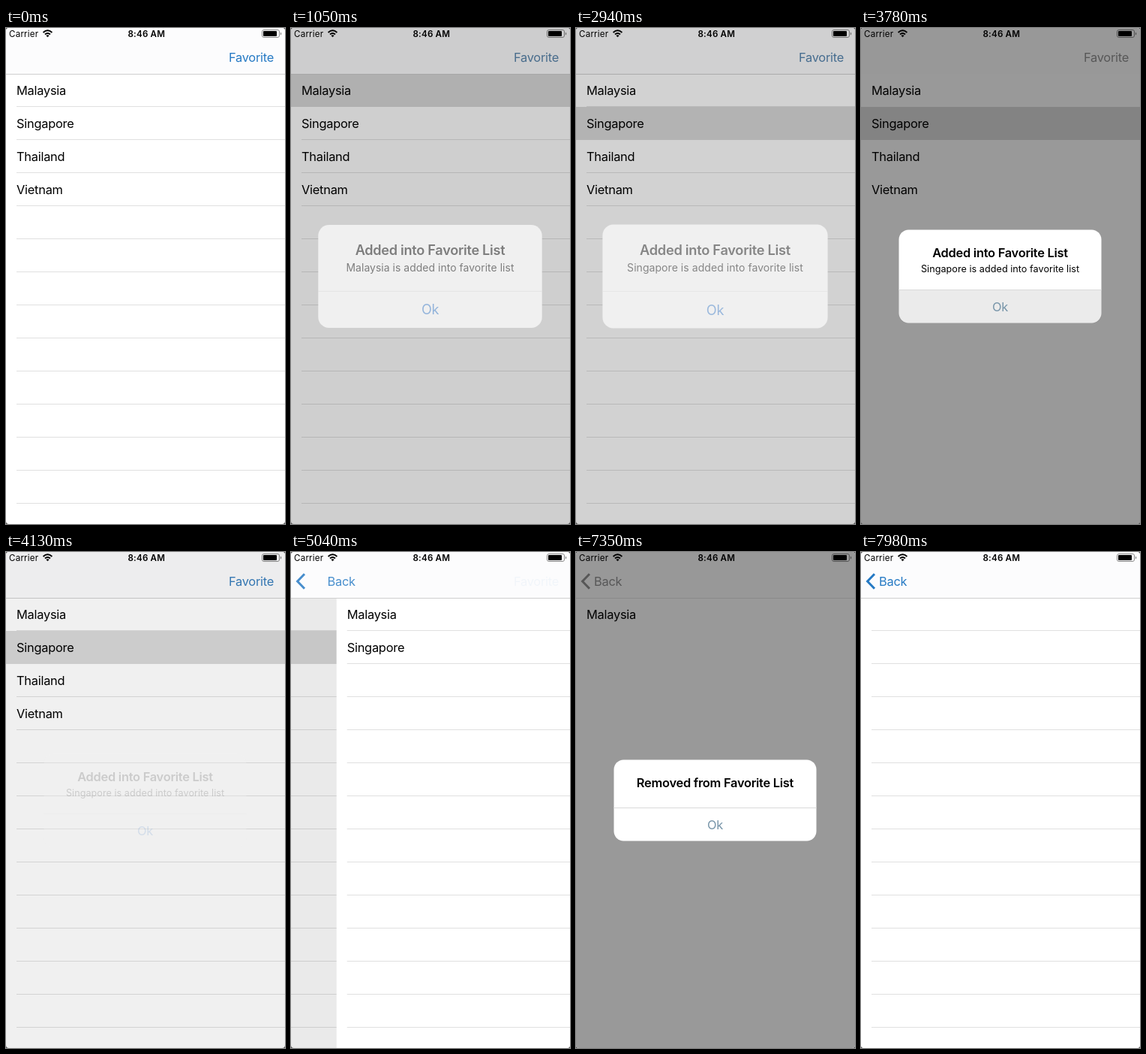
Animation, 372 px wide and 660 px high, one loop 8 s. Source, as an HTML page:

```html
<!DOCTYPE html>
<html lang="en">
<head>
<meta charset="utf-8">
<title>Favorite list</title>
<style>
  html, body { margin: 0; width: 100%; height: 100%; overflow: hidden; background: #555; }
  svg { display: block; width: 372px; height: 660px; border-radius: 4px; background: #fff; }
  text { font: 400 16.4px Inter, "Liberation Sans", sans-serif; letter-spacing: -.25px; fill: #000; }
  .status text { font-size: 11.6px; letter-spacing: .2px; }
  .status .clock { font-weight: 600; }
  .bold { font-weight: 600; }
  .small { font-size: 12.6px; letter-spacing: .05px; }
  .mid { text-anchor: middle; }
  .line { stroke: #e0e0e0; opacity: var(--lines); }
  .hair { stroke: #cfcfcf; opacity: var(--lines); }
  .tint { fill: var(--tint); }
  .chevron { fill: none; stroke: var(--tint); stroke-width: 3; }
</style>
</head>
<body>
<svg viewBox="0 0 372 660">
  <g id="home">
    <rect id="selected" width="372" height="44" fill="#d9d9d9"/>
  </g>
  <rect id="shade" width="372" height="660"/>
  <g id="favs">
    <rect y="62" width="372" height="598" fill="#fff"/>
  </g>

  <rect width="372" height="61" fill="#fcfcfd"/>
  <path class="hair" d="M0 61.5H372"/>
  <text id="favButton" class="tint" x="357" y="45.2" text-anchor="end">Favorite</text>
  <path id="chevron" class="chevron" d="M18 29.3L8.6 39L18 48.7"/>
  <text id="back" class="tint" y="45.2">Back</text>

  <g class="status">
    <text x="4" y="11.6">Carrier</text>
    <text class="clock mid" x="187.3" y="11.6">8:46 AM</text>
    <g fill="none" stroke="#000" stroke-width="2">
      <path d="M49.6 5.9Q55.5 .7 61.4 5.9"/>
      <path d="M52 8.5Q55.5 5.4 59 8.5"/>
    </g>
    <path d="M53.4 10Q55.5 8.3 57.6 10L55.5 12.3Z"/>
    <rect x="341.5" y="2.5" width="23" height="10" rx="2.4" fill="none" stroke="#888"/>
    <rect x="343" y="4" width="18" height="7" rx="1"/>
    <path d="M366 5.4Q368.4 7.5 366 9.6Z" fill="#777"/>
  </g>

  <rect id="dim" width="372" height="660"/>
  <g id="alert">
    <rect id="card" x="-135" width="270" rx="13"/>
    <g id="content">
      <path id="pressed" fill="#000" fill-opacity=".08"/>
      <path id="rule" stroke="#dadada"/>
      <text id="title" class="bold mid"></text>
      <text id="message" class="small mid" y="-6"></text>
      <text id="ok" class="mid">Ok</text>
    </g>
  </g>
</svg>
<script>
const LOOP = 8000, ROW = 44, TOP = 61;
const $ = id => document.getElementById(id);
const root = document.querySelector('svg');

const set = (el, attrs) => {
  for (const k in attrs) el.setAttribute(k, attrs[k]);
  return el;
};
const add = (parent, tag, attrs) =>
  parent.appendChild(set(document.createElementNS(root.namespaceURI, tag), attrs));
const mix = (a, b, k) => 'rgb(' + a.map((v, i) => Math.round(v + (b[i] - v) * k)) + ')';

// Critically damped spring from 0 to 1; w is in 1/ms.
const spring = (ms, w) => {
  if (ms <= 0) return 0;
  const v = 1 - (1 + w * ms) * Math.exp(-w * ms);
  return v > .994 ? 1 : v;
};

function fillTable(page, names) {
  for (let y = TOP + ROW - .5; y < 660; y += ROW)
    add(page, 'path', { class: 'line', d: `M14 ${y}H372` });
  return names.map((name, i) => {
    const label = add(page, 'text', { x: 14, y: TOP + ROW * i + 27.6 });
    label.textContent = name;
    return label;
  });
}
const homeTable = fillTable($('home'), ['Malaysia', 'Singapore', 'Thailand', 'Vietnam']);
const [favMalaysia, favSingapore] = fillTable($('favs'), ['Malaysia', 'Singapore']);
// The selection covers the separator below its row.
$('home').insertBefore($('selected'), homeTable[0]);

const added = name => ({
  title: 'Added into Favorite List',
  message: name + ' is added into favorite list',
  half: 62, titleY: -26
});
const alerts = [
  { show: 928, press: 1610, hide: 1980, ...added('Malaysia') },
  { show: 2826, press: 3780, hide: 3990, ...added('Singapore') },
  { show: 6248, press: 6930, hide: 7355, title: 'Removed from Favorite List', message: '', half: 54, titleY: -18 }
];
const BLUE = [38, 122, 196], GREY = [145, 145, 145];
const OK_BLUE = [46, 115, 196], OK_DULL = [118, 148, 168];

function drawAlert(t) {
  const a = alerts.findLast(a => t >= a.show) || alerts[0];
  const shown = spring(t - a.show, .013);
  const p = shown * (1 - spring(t - a.hide, .024));
  const clear = Math.min(1, (1 - p) * 3.5);

  root.style.setProperty('--lines', clear);
  root.style.setProperty('--tint', mix(BLUE, GREY, p));
  set($('dim'), { opacity: .4 * p });
  set($('alert'), {
    visibility: p > 0 ? 'visible' : 'hidden',
    transform: `translate(185.5 330.5) scale(${1.2 - .2 * shown})`
  });

  const glow = Math.max(0, (p - .43) / .57) ** 2;
  set($('card'), {
    y: -a.half, height: a.half * 2,
    fill: mix([240, 240, 240], [255, 255, 255], glow),
    opacity: Math.min(1, p * 2.3)
  });
  set($('content'), { opacity: p });

  const edge = a.half - ROW;
  const held = t >= a.press && t < a.hide - 60;
  set($('pressed'), {
    d: `M-135 ${edge}H135V${a.half - 13}q0 13 -13 13H-122q-13 0 -13 -13Z`,
    opacity: held ? 1 : 0
  });
  set($('rule'), { d: `M-135 ${edge}H135` });
  set($('title'), { y: a.titleY }).textContent = a.title;
  $('message').textContent = a.message;
  set($('ok'), { y: a.half - 16, fill: mix(OK_BLUE, OK_DULL, 1 - clear) });
  $('ok').style.fill = mix(OK_BLUE, OK_DULL, 1 - clear);
}

function drawPages(t) {
  const push = spring(t - 4790, .013);
  const row = t < 2730 ? 0 : 1;
  set($('selected'), { y: TOP + ROW * row, opacity: t >= 910 ? 1 : 0 });
  set($('home'), { transform: `translate(${-112 * push} 0)` });
  set($('shade'), { opacity: .1 * push });
  set($('favs'), { transform: `translate(${372 * (1 - push)} 0)` });
  set($('favButton'), { opacity: (t < 4690 ? 1 : .3) * (1 - push) });
  set($('chevron'), { opacity: push });
  set($('back'), { x: 24 + 150 * (1 - push), opacity: push });
  set(favSingapore, { opacity: t < 6230 ? 1 : 0 });
  set(favMalaysia, { opacity: t < 7980 ? 1 : 0 });
}

const start = performance.now();
function frame() {
  const t = (performance.now() - start) % LOOP;
  drawPages(t);
  drawAlert(t);
  requestAnimationFrame(frame);
}
frame();
</script>
</body>
</html>
```
